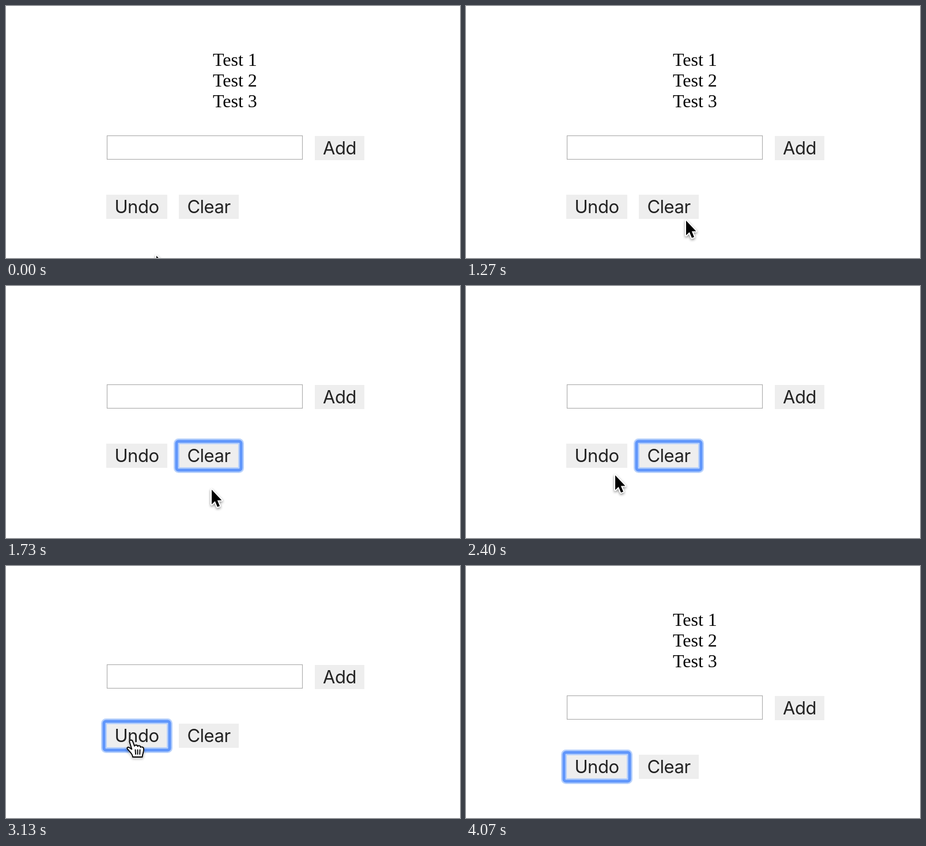
An HTML page with a canvas that plays this animation: 788 by 438 pixels, repeating every 4740 ms.

```html
<!DOCTYPE html>
<html lang="en">
<head>
<meta charset="utf-8">
<title>Undo and clear</title>
<style>
  html, body { margin: 0; width: 100%; height: 100%; overflow: hidden; background: #fff; }
  canvas { display: block; }
</style>
</head>
<body>
<canvas id="stage" width="788" height="438"></canvas>
<script>
const ctx = document.getElementById('stage').getContext('2d');
const LOOP = 4740, TICK = 1000 / 15;

const arrow = new Path2D('M0 0V25.5L5.8 20 10 30 14 28.4 9.8 18.6H17.4Z');
const hand = new Path2D('M11 31C11 26 6 22 2 17.5C0 15 2.5 13 5 14.5L9.3 17.5 5.5 5C4.5 1 9.5 0 11 4L14 12' +
  'C15 9.5 19 9.5 19.5 12.5C21 10.5 24.5 11 24.5 14C27 12.5 30 14 30 17C30.5 22 28 25 27.5 31Z');
const creases = new Path2D('M15.5 18.5L16 26M19.5 18.5V26M23.5 18.5L23.2 26');

const smooth = p => p * p * (3 - 2 * p);
const speedUp = p => p ** 1.3;
const slowDown = p => 1 - (1 - p) ** 2;

// Pointer moves in ticks: each is a quadratic curve starting where the last one ended.
const start = [261, 434];
const moves = [
  { from: 11, to: 19, via: [225, 395], end: [382, 373], ease: smooth },
  { from: 19, to: 21, via: [368, 361], end: [357, 354], ease: slowDown },
  { from: 29, to: 36, via: [325, 375], end: [259, 329], ease: speedUp },
  { from: 36, to: 40, via: [235, 320], end: [219, 304], ease: slowDown },
  { from: 52, to: 53, via: [241, 285], end: [264, 265], ease: smooth }
];

function pointerAt(tick) {
  let pos = start;
  for (const { from, to, via, end, ease } of moves) {
    if (tick <= from) break;
    const p = ease(Math.min(1, (tick - from) / (to - from))), q = 1 - p;
    pos = pos.map((a, i) => q * q * a + 2 * p * q * via[i] + p * p * end[i]);
  }
  return pos;
}

const within = (tick, from, to) => tick >= from && tick < to;

function ring(x, y, w, h) {
  ctx.beginPath();
  ctx.roundRect(x - 4, y - 4, w + 8, h + 8, 3.5);
  for (const [color, width] of [['#b7d1fc', 10], ['#6096fb', 5]]) {
    ctx.strokeStyle = color;
    ctx.lineWidth = width;
    ctx.stroke();
  }
}

function button(label, x, y, w, focused) {
  const h = 42;
  ctx.fillStyle = '#eee';
  ctx.fillRect(x, y, w, h);
  if (focused) ring(x, y, w, h);
  ctx.font = '31px Inter, sans-serif';
  ctx.letterSpacing = '-0.5px';
  ctx.textAlign = 'center';
  ctx.fillStyle = '#222';
  ctx.fillText(label, x + w / 2, y + 32);
}

function list() {
  ctx.font = '32px "Liberation Serif", serif';
  ctx.letterSpacing = '0px';
  ctx.textAlign = 'left';
  ctx.fillStyle = '#000';
  for (let i = 0; i < 3; i++) ctx.fillText('Test ' + (i + 1), 359, 104 + 36 * i);
}

function pointer(tick) {
  const [x, y] = pointerAt(tick);
  const isHand = within(tick, 20, 26) || within(tick, 38, 49);
  const shape = isHand ? hand : arrow;
  ctx.save();
  ctx.translate(isHand ? x - 10 : x, isHand ? y - 3 : y);
  ctx.lineJoin = ctx.lineCap = 'round';
  ctx.save();
  ctx.shadowColor = 'rgba(0,0,0,.45)';
  ctx.shadowBlur = 4;
  ctx.shadowOffsetY = 2;
  ctx.strokeStyle = '#fff';
  ctx.lineWidth = isHand ? 2 : 4;
  ctx.stroke(shape);
  ctx.restore();
  ctx.fillStyle = isHand ? '#fff' : '#000';
  ctx.fill(shape);
  if (isHand) {
    ctx.strokeStyle = '#000';
    ctx.lineWidth = 1.9;
    ctx.stroke(shape);
    ctx.stroke(creases);
  }
  ctx.restore();
}

function draw(now) {
  const tick = Math.floor((now % LOOP + 4) / TICK);
  const empty = within(tick, 25, 48);
  const top = empty ? 171 : 225;

  ctx.fillStyle = '#fff';
  ctx.fillRect(0, 0, 788, 438);
  if (!empty) list();

  ctx.strokeStyle = '#b0b0b0';
  ctx.lineWidth = 1.2;
  ctx.strokeRect(175.5, top + 0.5, 339, 41);

  button('Add', 536, top + 1, 86);
  button('Undo', 174, top + 103, 106, tick >= 45);
  button('Clear', 300, top + 103, 104, within(tick, 23, 45));
  if (tick < 54) pointer(tick);
}

let origin;
function frame(now) {
  origin ??= now;
  draw(now - origin);
  requestAnimationFrame(frame);
}
requestAnimationFrame(frame);
</script>
</body>
</html>
```
